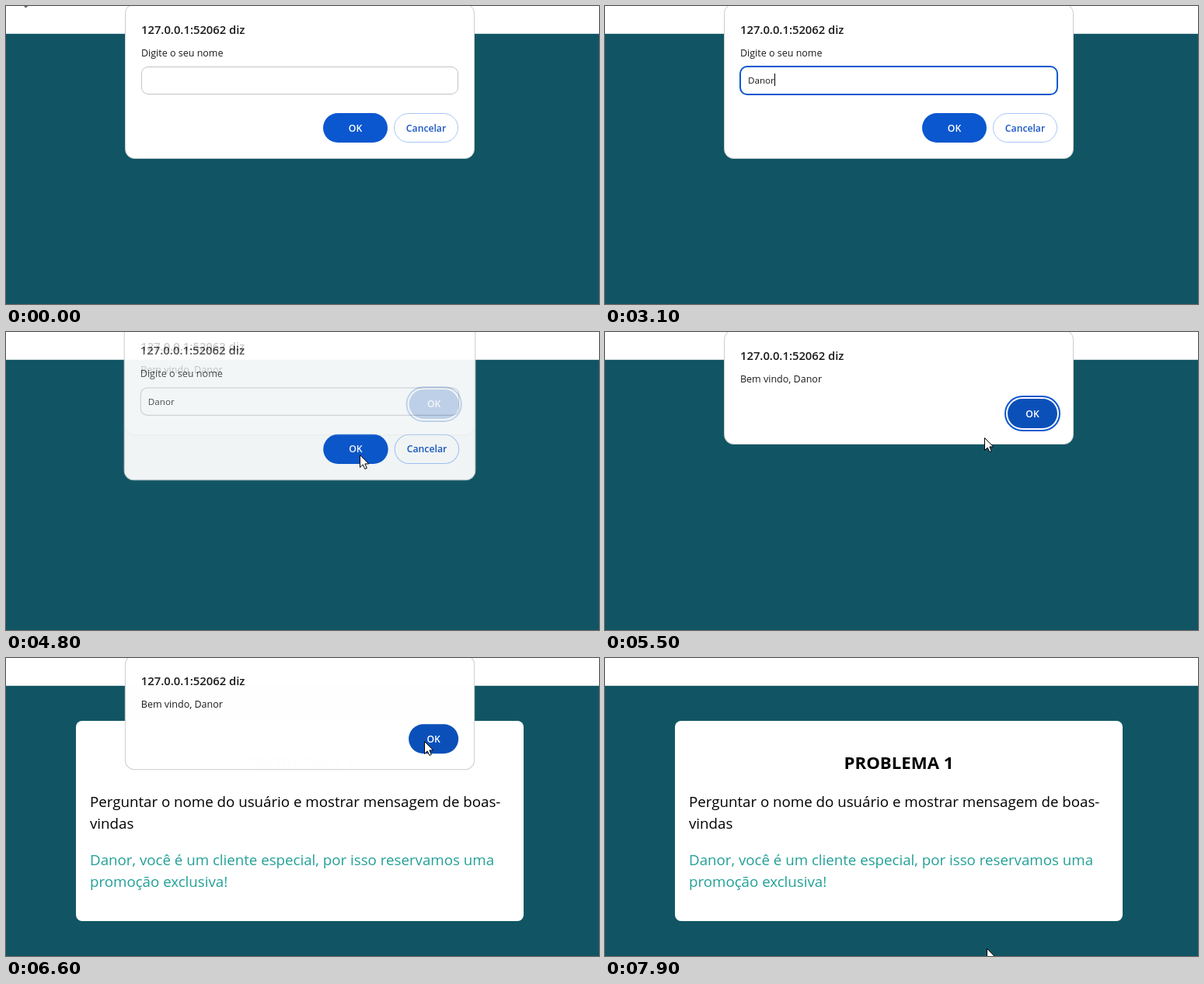
Recreate the animation shown at these times as an HTML page with a canvas. Size 763 px wide and 384 px high, loop 8 s.

```html
<!DOCTYPE html>
<html lang="pt">
<head>
<meta charset="utf-8">
<style>
html, body { margin: 0; width: 100%; height: 100%; overflow: hidden; background: #115564; }
canvas { display: block; }
</style>
</head>
<body>
<canvas id="stage" width="763" height="384"></canvas>
<script>
const W = 763, H = 384, LOOP = 8000, STEP = 100;
const NAME = 'Danor';
const BLUE = '#0b57d0', DARK_BLUE = '#0b50b9', INK = '#1a1a1a';
const FONT = '"Open Sans", "Noto Sans", sans-serif';

// Story beats in ms
const FOCUS = 1300, TYPE = 2600, TYPED = 3100, SUBMIT = 4700, ACCEPT = 6600;
const KEY_GAP = (TYPED - TYPE) / (NAME.length - 1), BLINK = 530;

// Pointer glides: start, end, then where it arrives
const GLIDES = [
  [200, 500, 145, 40], [700, 1000, 174, 84], [3200, 4000, 470, 164], [4100, 4400, 455, 158],
  [5300, 5800, 526, 110], [5900, 6200, 538, 107], [7000, 7300, 580, 304], [7400, 7900, 491, 374]
];

const stage = document.getElementById('stage').getContext('2d');
const layerCanvas = document.createElement('canvas');
layerCanvas.width = W;
layerCanvas.height = H;
const layer = layerCanvas.getContext('2d');

const clamp = v => Math.min(1, Math.max(0, v));
const progress = (t, start, length) => clamp((t - start) / length);

function text(c, str, x, y, size, color = INK, weight = 400, align = 'left') {
  c.font = `${weight} ${size}px ${FONT}`;
  c.fillStyle = color;
  c.textAlign = align;
  c.fillText(str, x, y);
}

function box(c, x, y, w, h, r, fill, stroke, line = 1) {
  c.beginPath();
  c.roundRect(x, y, w, h, r);
  if (fill) { c.fillStyle = fill; c.fill(); }
  if (stroke) { c.strokeStyle = stroke; c.lineWidth = line; c.stroke(); }
}

function button(c, label, x, y, w, fill, color, stroke) {
  const inset = stroke ? 0.5 : 0;
  box(c, x + inset, y + inset, w - 2 * inset, 38 - 2 * inset, 19, fill, stroke);
  text(c, label, x + w / 2, y + 23.5, 12.2, color, 600, 'center');
}

function panel(c, bottom, message) {
  box(c, 153.5, -2.5, 449, bottom + 2, 12, '#fff', '#c9cdcf');
  text(c, '127.0.0.1:52062 diz', 174, 36, 14.8, INK, 600);
  text(c, message, 174, 65, 12.5);
}

// The caret stays lit while typing and blinks otherwise
function caretOn(t) {
  const since = t < TYPE ? FOCUS : Math.min(t, TYPED);
  return Math.floor((t - since) / BLINK) % 2 === 0;
}

function prompt(c, t) {
  panel(c, 197, 'Digite o seu nome');
  const focused = t >= FOCUS && t < SUBMIT;
  if (focused) box(c, 174, 78, 408, 36, 9, null, BLUE, 2);
  else box(c, 174.5, 78.5, 407, 35, 8.5, null, '#c2c4c6');

  const typed = NAME.slice(0, Math.max(0, Math.floor((t - TYPE) / KEY_GAP) + 1));
  text(c, typed, 184, 100, 11.6);
  if (focused && caretOn(t)) {
    c.fillStyle = '#000';
    c.fillRect(184 + Math.round(c.measureText(typed).width), 87, 1, 16);
  }
  button(c, 'OK', 408, 138, 83, BLUE, '#fff');
  button(c, 'Cancelar', 499, 138, 83, '#fff', '#1a56c4', '#a8c7fa');
}

function welcome(c, t) {
  panel(c, 145, 'Bem vindo, ' + NAME);
  if (t < ACCEPT) box(c, 515, 83, 70, 44, 22, null, BLUE, 2);
  button(c, 'OK', 518, 86, 64, DARK_BLUE, '#fff');
}

// Slides and fades a dialog as one layer: in after `open`, up and out from `close`
function dialog(draw, t, open, close) {
  const rest = (1 - progress(t, open, 300)) ** 2;
  const out = progress(t, close - STEP, 400);
  const scale = 1 + 0.009 * rest + 0.048 * out ** 3;
  layer.clearRect(0, 0, W, H);
  layer.save();
  layer.translate(W / 2 - 3.5, -28 * rest - 56 * out ** 3);
  layer.scale(scale, scale);
  layer.translate(3.5 - W / 2, 0);
  draw(layer, t);
  layer.restore();
  stage.globalAlpha = progress(t, open, 300) ** 1.4 * (1 - out ** 4);
  stage.drawImage(layerCanvas, 0, 0);
  stage.globalAlpha = 1;
}

function card(c) {
  const green = '#22a097', size = 18.72;
  box(c, 90, 81, 576, 258, 8, '#fff');
  text(c, 'PROBLEMA 1', 378, 143, 22.2, '#000', 700, 'center');
  text(c, 'Perguntar o nome do usuário e mostrar mensagem de boas-', 108, 192, size, '#000');
  text(c, 'vindas', 108, 220, size, '#000');
  text(c, NAME + ', você é um cliente especial, por isso reservamos uma', 108, 267, size, green);
  text(c, 'promoção exclusiva!', 108, 295, size, green);
}

function pointer(c, t) {
  // No arrow while it rests over text
  if ((t >= 1000 && t < 3700) || (t >= 7400 && t < 7900)) return;
  let x = 18, y = -17;
  for (const [start, end, toX, toY] of GLIDES) {
    const p = progress(t, start, end - start) ** 0.85;
    x += (toX - x) * p;
    y += (toY - y) * p;
  }
  c.save();
  c.translate(Math.round(x) + 0.5, Math.round(y) + 0.5);
  c.fillStyle = '#fff';
  c.strokeStyle = '#000';
  c.lineWidth = 1;
  const arrow = new Path2D('M0 0V16L3.7 12.4L6.3 18L8.8 17L6.4 11.4H11.2Z');
  c.fill(arrow);
  c.stroke(arrow);
  c.restore();
}

function render(t) {
  stage.fillStyle = '#115564';
  stage.fillRect(0, 0, W, H);
  stage.fillStyle = '#fff';
  stage.fillRect(0, 0, W, 35.8);
  if (t >= ACCEPT) card(stage);
  dialog(prompt, t, -300, SUBMIT);
  dialog(welcome, t, SUBMIT, ACCEPT);
  pointer(stage, t);
}

const start = performance.now();
function tick() {
  const t = (performance.now() - start) % LOOP;
  render(Math.floor(t / STEP) * STEP);
  requestAnimationFrame(tick);
}
tick();
</script>
</body>
</html>
```
